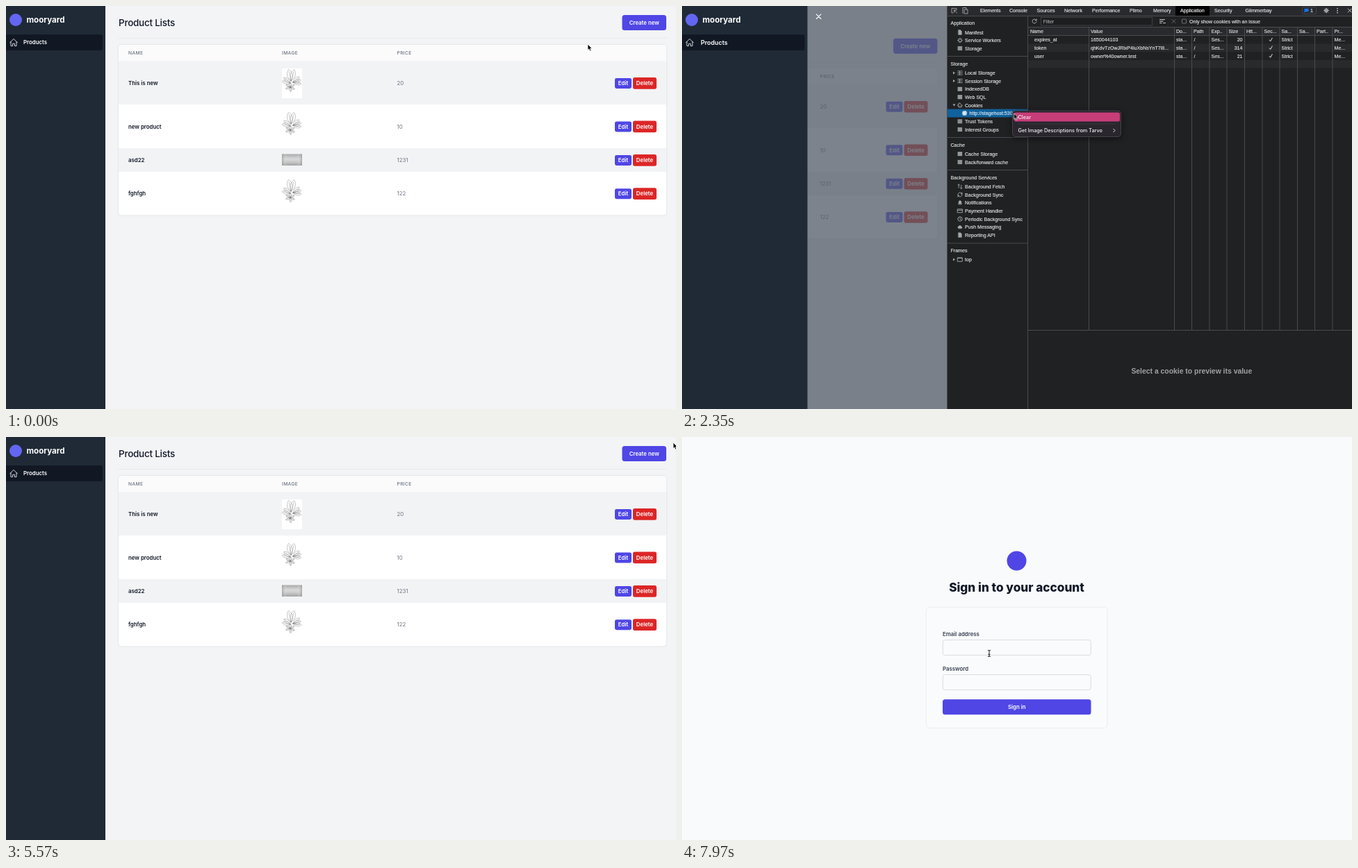
These frames come from a looping animation (964x581 px, 8000 ms). An HTML page:

```html
<!DOCTYPE html>
<html lang="en">
<head>
<meta charset="utf-8">
<title>Session expiry demo</title>
<style>
  html, body { margin: 0; width: 100%; height: 100%; overflow: hidden; background: #f3f4f6; }
  svg { display: block; width: 100%; height: 100%; }
  text { font-family: Inter, sans-serif; white-space: pre; }
  .dev text { font-family: "Liberation Sans", Arial, sans-serif; }
  .line { fill: none; stroke-linecap: round; stroke-linejoin: round; }
  .card { filter: drop-shadow(0 .6px .8px #0000001f); }

  #list, #tools, #login, #logo, #badge, #rows, #blur, #pick,
  #arrow, #cross, #hand, #beam { animation: 8s step-end infinite; }
  #list { animation-name: list; }
  #tools { animation-name: tools; }
  #login { animation-name: login; }
  #logo { animation-name: logo; }
  #badge { animation-name: badge; }
  #rows { animation-name: rows; }
  #blur { animation-name: blur; }
  #pick { animation-name: pick; }
  #arrow { animation-name: arrow; }
  #cross { animation-name: cross; }
  #hand { animation-name: hand; }
  #beam { animation-name: beam; }
  #menu { animation: menu 8s linear infinite; }
  #status { animation: status 8s linear infinite; }
  #cursor { animation: move 8s linear infinite; }

  /* 1% = 80 ms */
  @keyframes list { 0% { opacity: 1 } 2.125% { opacity: 0 } 69.625% { opacity: 1 } 87.125%, to { opacity: 0 } }
  @keyframes tools { 0% { opacity: 0 } 2.125% { opacity: 1 } 69.625%, to { opacity: 0 } }
  @keyframes login { 0% { opacity: 0 } 87.125%, to { opacity: 1 } }
  @keyframes logo { 0% { opacity: 0 } 89.25%, to { opacity: 1 } }
  @keyframes badge { 0% { opacity: 0 } 7.75%, to { opacity: 1 } }
  @keyframes rows { 0% { opacity: 1 } 39.4%, to { opacity: 0 } }
  @keyframes blur { 0% { opacity: 0 } 67.75%, to { opacity: 1 } }
  @keyframes pick { 0% { opacity: 0 } 28.625% { opacity: 1 } 36% { opacity: 0 } 36.75%, to { opacity: 1 } }
  @keyframes arrow { 0% { opacity: 1 } 6.2% { opacity: 0 } 7.75% { opacity: 1 } 81.6% { opacity: 0 } 87.125% { opacity: 1 } 95%, to { opacity: 0 } }
  @keyframes cross { 0% { opacity: 0 } 6.2% { opacity: 1 } 7.75%, to { opacity: 0 } }
  @keyframes hand { 0% { opacity: 0 } 81.6% { opacity: 1 } 87.125%, to { opacity: 0 } }
  @keyframes beam { 0% { opacity: 0 } 95%, to { opacity: 1 } }
  @keyframes menu { 0%, 25.62% { opacity: 0 } 25.625%, 38.6% { opacity: 1 } 40.6%, to { opacity: 0 } }
  @keyframes status { 0%, 84% { opacity: 0 } 85.25%, 88.6% { opacity: 1 } 90.5%, to { opacity: 0 } }
  @keyframes move {
    0%, 2.125% { transform: translate(837px, 55px) }
    5% { transform: translate(830px, 66px) }
    7%, 7.75% { transform: translate(820.5px, 72px) }
    8.375%, 10.6% { transform: translate(645px, 102px) }
    12.875%, 15.5% { transform: translate(485px, 107px) }
    21.25%, 28% { transform: translate(474px, 152.5px) }
    29.375% { transform: translate(477.5px, 154.5px) }
    32.25%, 38.6% { transform: translate(479px, 155px) }
    44.375%, 47.4% { transform: translate(890px, 181px) }
    49.125%, 52.125% { transform: translate(564px, 97px) }
    55%, 57.6% { transform: translate(419px, 43px) }
    59.5%, 61.75% { transform: translate(958px, 7px) }
    62.5%, 71.8% { transform: translate(960px, 8px) }
    74%, 75.8% { transform: translate(891px, 64px) }
    78.125% { transform: translate(816px, 54px) }
    80% { transform: translate(842px, 78px) }
    82.375%, 88.5% { transform: translate(881.5px, 111px) }
    92.5% { transform: translate(620px, 222px) }
    96.75% { transform: translate(442px, 310px) }
    97.5% { transform: translate(442px, 311px) }
    99.6%, to { transform: translate(442px, 312px) }
  }
</style>
</head>
<body>
<svg viewBox="0 0 964 581">
  <defs>
    <linearGradient id="grey" x2="0" y2="1">
      <stop stop-color="#a9aaa9"/><stop offset=".4" stop-color="#d6d7d6"/>
      <stop offset=".6" stop-color="#cfd0cf"/><stop offset="1" stop-color="#a4a5a4"/>
    </linearGradient>
    <linearGradient id="edge">
      <stop stop-color="#8b8c8b" stop-opacity=".6"/><stop offset=".25" stop-color="#fff" stop-opacity="0"/>
      <stop offset=".75" stop-color="#fff" stop-opacity="0"/><stop offset="1" stop-color="#8b8c8b" stop-opacity=".6"/>
    </linearGradient>
    <g id="flower"></g>
  </defs>
  <g id="list"></g>
  <g id="tools"></g>
  <g id="login"></g>
  <g id="status"></g>
  <g id="cursor">
    <path id="arrow" d="M0 0V8.6L1.9 6.9 3.2 9.9 4.8 9.2 3.5 6.3H6.1Z" fill="#000" stroke="#fff" stroke-width=".8"/>
    <g id="cross" class="line">
      <path d="M-3.2 3.8H3.2M0 .6V7" stroke="#fff" stroke-width="3.2"/>
      <path d="M-3.2 3.8H3.2M0 .6V7" stroke="#111" stroke-width="1.5"/>
    </g>
    <path id="hand" d="M-.6 .4Q.3-.5 1 .5V4L4.6 4.8Q6 5.3 5.6 7L4.8 10.3H.5L-2.4 6.6Q-2.6 5.2-.6 6.2Z" fill="#fff" stroke="#000" stroke-width=".7"/>
    <path id="beam" class="line" d="M-1.6-4.6Q0-4.8 0-3.6 0-4.8 1.6-4.6M0-3.6V3.6M-1.6 4.6Q0 4.8 0 3.6 0 4.8 1.6 4.6M-1 1.4H1" stroke="#111" stroke-width=".9"/>
  </g>
</svg>
<script>
const $ = id => document.getElementById(id);
const INDIGO = '#4f46e5', RED = '#dc2626', SMALL = 7.85;
const MID = 'text-anchor="middle"', SEMI = 'font-weight="600"';

// y is the optical middle of the capitals
const text = (x, y, s, size, fill, more = '') =>
  `<text x="${x}" y="${y + size * .36}" font-size="${size}" fill="${fill}" ${more}>${s}</text>`;
const rect = (x, y, w, h, fill, more = '') =>
  `<rect x="${x}" y="${y}" width="${w}" height="${h}" fill="${fill}" ${more}/>`;
const line = (d, stroke, width = 1, more = '') =>
  `<path class="line" d="${d}" stroke="${stroke}" stroke-width="${width}" ${more}/>`;
const button = (x, y, w, h, fill, label) =>
  rect(x, y, w, h, fill, `rx="${h * .16}"`) + text(x + w / 2, y + h / 2, label, SMALL, '#fff', MID + ' ' + SEMI);

function petals(cx, cy, len, angles) {
  const w = len * .27;
  const d = `M0 0C${-w} ${-len * .3} ${-w} ${-len * .75} 0 ${-len}C${w * 1.2} ${-len * .7} ${w} ${-len * .3} 0 0M0 0Q${w * .3} ${-len * .4} 0 ${-len * .8}`;
  return angles.map(a => line(d, '#777', .4, `transform="translate(${cx} ${cy}) rotate(${a})"`)).join('');
}
$('flower').innerHTML = petals(13, 18, 17, [-12, 16]) + petals(16, 20, 12, [48, 74, 100])
  + petals(12, 21, 12, [-78, -50]) + petals(12, 27, 7, [-110, -60, 0, 60, 115, 175]);

function nav(width, x, size) {
  return rect(0, 0, width, 581, '#1f2a36')
    + '<circle cx="14" cy="20" r="9" fill="#6366f1"/>'
    + text(29.5, 19.5, 'mooryard', 11.6, '#fff', 'font-weight="700"')
    + rect(-4, 41, width, 23, '#111824', 'rx="3"')
    + line('M5.6 52.8L11 47.4 16.4 52.8M7 51.6V57.6H9.6V54.3H12.4V57.6H15V51.6', '#e5e7eb', .9)
    + text(x, 52.3, 'Products', size, '#fff', SEMI);
}

function products(left, imageX, priceX, right, dy) {
  const wide = right - left, head = 'font-weight="550" letter-spacing=".34"';
  let s = text(left, 24, 'Product Lists', 13.5, '#111827', 'font-weight="550" letter-spacing="-.25"')
    + button(right - 63.5, 13, 63.5, 22, INDIGO, 'Create new')
    + line(`M${left} 46.5H${right}`, '#e5e7eb', .7)
    + rect(left, 56, wide, 245.5, '#fff', 'rx="4.5" class="card"')
    + rect(left, 56, wide, 24, '#fbfbfc', 'rx="4.5"')
    + line(`M${left} 80H${right}`, '#e5e7eb', .7)
    + text(left + 14, 68, 'NAME', 6.7, '#6b7280', head)
    + text(imageX, 68, 'IMAGE', 6.7, '#6b7280', head)
    + text(priceX, 68, 'PRICE', 6.7, '#6b7280', head);
  [['This is new', 20, 80, 62], ['new product', 10, 142, 63], ['asd22', 1231, 205, 34], ['fghfgh', 122, 239, 62.5]]
    .forEach(([name, price, y, h], i) => {
      const mid = y + h / 2 + .4;
      if (i % 2 == 0) s += rect(left, y, wide, h, '#f2f3f5');
      s += text(left + 14, mid, name, SMALL, '#111827', SEMI) + text(priceX, mid, price, SMALL, '#6b7280');
      s += i == 2
        ? rect(imageX, 213.5, 29, 16.5, 'url(#grey)') + rect(imageX, 213.5, 29, 16.5, 'url(#edge)')
        : rect(imageX, y + 10, 29, 43, '#fff') + `<use href="#flower" x="${imageX}" y="${y + 10}"/>`;
      s += button(right - 74, mid - 7.5, 24, 15, INDIGO, 'Edit')
        + button(right - 48, mid - 8.3, 34, 16.6, RED, 'Delete');
    });
  return `<g transform="translate(0 ${dy})">${s}</g>`;
}

$('list').innerHTML = rect(0, 0, 964, 581, '#f3f4f6') + products(162, 397, 562.5, 950, 0) + nav(143, 25, SMALL);

const INK = '#e3e4e6', DIM = '#a6a8ab', RULE = '#494b4f';
const icons = {
  file: 'M-2.4-3.4H.6L2.4-1.6V3.4H-2.4Z!',
  gear: 'M-2.2 0A2.2 2.2 0 1 0 2.2 0 2.2 2.2 0 1 0-2.2 0M0-3.5V-2.2M0 2.2V3.5M-3.5 0H-2.2M2.2 0H3.5M-2.4-2.4L-1.6-1.6M1.6 1.6L2.4 2.4M-2.4 2.4L-1.6 1.6M1.6-1.6L2.4-2.4',
  db: 'M-3-2.7H3V-1.3H-3ZM-3-.7H3V.7H-3ZM-3 1.3H3V2.7H-3Z!',
  grid: 'M-3.3-2.6H3.3M-3.3 0H3.3M-3.3 2.6H3.3M-.6-2.6V2.6',
  cookie: 'M-3.2 0A3.2 3.2 0 1 0 3.2 0Q1.8 0 1.4-1.3 0-1.5 0-3.2A3.2 3.2 0 0 0-3.2 0M-1.4-.8V-.7M.2 1.5V1.6M-1.3 1.4V1.5M1.6 1V1.1',
  fetch: 'M-1.8 2V-3.2M-3-2L-1.8-3.2-.6-2M1.8-2V3.2M.6 2L1.8 3.2 3 2',
  sync: 'M-2.9 1A3 3 0 0 1 2-2.2L3-1.4M3-3V-1.4H1.4M2.9-.6A3 3 0 0 1-2 2.2L-3 1.4M-3 3V1.4H-1.4',
  bell: 'M-2.8 2L-2 1V-1Q-1.8-2.8 0-3 1.8-2.8 2 -1V1L2.8 2ZM-.6 3H.6!',
  card: 'M-3.4-2.5H3.4V2.5H-3.4ZM-3.4-.8H3.4',
  clock: 'M-3.2 0A3.2 3.2 0 1 0 3.2 0 3.2 3.2 0 1 0-3.2 0M0-1.9V.2L1.4 1',
  cloud: 'M-2 2.2A1.7 1.7 0 0 1-2-1 2.3 2.3 0 0 1 2.1-.6 1.5 1.5 0 0 1 2.2 2.2Z!',
  frame: 'M-3.3-2.7H3.3V2.7H-3.3ZM-3.3-2.1H3.3'
};
// a trailing "!" marks a solid icon
function icon(name, x, y, color = DIM) {
  const [d, solid] = icons[name].split('!');
  return line(d, color, solid == null ? .9 : .4,
    `transform="translate(${x} ${y})"` + (solid == null ? '' : ` style="fill:${color}"`));
}
const label = (x, y, s, fill = INK, more = '') =>
  text(x, y, s, 7.08, fill, `stroke="${fill}" stroke-width=".15" ${more}`);
const folded = y => `<path d="M390 ${y - 2}L393 ${y} 390 ${y + 2}Z" fill="${DIM}"/>`;

function sidebar() {
  const items = [
    ['file', 'Manifest', 38], ['gear', 'Service Workers', 49.5], ['db', 'Storage', 61],
    ['grid', 'Local Storage', 96.5], ['grid', 'Session Storage', 108], ['db', 'IndexedDB', 119.7],
    ['db', 'Web SQL', 131.3], ['cookie', 'Cookies', 143], ['db', 'Trust Tokens', 166.4],
    ['db', 'Interest Groups', 178], ['db', 'Cache Storage', 213.2], ['db', 'Back/forward cache', 225],
    ['fetch', 'Background Fetch', 260.2], ['sync', 'Background Sync', 272], ['bell', 'Notifications', 283.6],
    ['card', 'Payment Handler', 295.3], ['clock', 'Periodic Background Sync', 307],
    ['cloud', 'Push Messaging', 318.6], ['file', 'Reporting API', 330.2], ['frame', 'top', 365.6]
  ];
  const heads = { Application: 24.5, Storage: 83, Cache: 200, 'Background Services': 247, Frames: 352 };
  const chosen = fill => rect(382, 148.6, 115.5, 11.8, fill);
  return chosen('#10629d') + `<g id="blur">${chosen('#454749')}</g>`
    + '<circle cx="406.5" cy="154.6" r="3.5" fill="#f1f6fa"/>' + icon('cookie', 406.5, 154.6, '#7fa9c8')
    + label(413.5, 154.6, 'http://stagehost:5300', '#e4eef6')
    + items.map(([i, s, y]) => icon(i, 400, y) + label(407, y, s)).join('')
    + Object.entries(heads).map(([s, y]) => label(386.5, y, s)).join('')
    + [96.5, 108, 365.6].map(folded).join('')
    + `<path d="M389.5 141.6H393.5L391.5 144.6Z" fill="${DIM}"/>`
    + line('M382 72.5H497M382 189.5H497M382 236.5H497M382 342H497', RULE);
}

function toolbar() {
  const tabs = { Elements: 429, Console: 471, Sources: 510.5, Network: 550, Performance: 590, Plimo: 644,
    Memory: 678, Application: 717, Security: 766, Glimmerbay: 810.5 };
  return rect(382, 0, 582, 14, '#292a2d') + rect(710, 0, 49, 14, '#000')
    + line('M382 14.5H964', RULE)
    + line('M390 9.8H388V3.4H395V5.5M391.5 6L395.5 10M391.5 6V9M391.5 6H394.5', DIM, .9)
    + line('M404 10.5V2.5H409V4.5M406.5 5H411V11H406.5Z', DIM, .9)
    + Object.entries(tabs).map(([s, x]) => label(x, 6.6, s, s == 'Application' ? '#fff' : INK)).join('')
    + `<g id="badge">${rect(892.5, 1.5, 20, 10, 'none', `rx="1" stroke="${RULE}" stroke-width=".8"`)}
       <path d="M895.5 3.8H901.5V8.2H897.5L895.5 9.8Z" fill="#1a73e8"/>${label(904, 6.6, '1')}</g>`
    + icon('gear', 927, 6.5, '#c4c6c9') + line('M927 4V9M924.5 6.5H929.5', '#c4c6c9', .9)
    + [3.6, 6.6, 9.6].map(y => `<circle cx="943" cy="${y}" r=".9" fill="#c4c6c9"/>`).join('')
    + line('M958.3 4L963.3 9M963.3 4L958.3 9', '#c4c6c9');
}

function cookies() {
  const columns = [['Name', 501], ['Value', 588], ['Do...', 711], ['Path', 736], ['Exp..', 761.5], ['Size', 786.5],
    ['Htt...', 812], ['Sec...', 837.5], ['Sa...', 862.5], ['Sa...', 888], ['Part..', 913], ['Pr...', 938.5]];
  const data = [['expires_at', '1650044103', 20], ['token', 'qhKdvTzOwJRlxP4iuXbNsYnT7l8...', 314],
    ['user', 'owner%40owner.test', 21]];
  const body = data.map(([name, value, size], i) => {
    const y = 48.6 + i * 11.7;
    return label(507, y, name) + label(588, y, value) + label(711, y, 'sta...') + label(736.5, y, '/')
      + label(761.5, y, 'Ses...') + label(806.5, y, size, INK, 'text-anchor="end"')
      + line(`M845.2 ${y + .4}L846.6 ${y + 2.3} 849.2 ${y - 2.4}`, INK, 1)
      + label(862.5, y, 'Strict') + label(938.5, y, 'Me...');
  }).join('');
  const funnel = color => line('M687.5 19.5H694.5M687.5 22H692M687.5 24.5H690M692.5 24.5H695.5', color, 1);
  return rect(498, 31, 466, 11.5, '#292a2d')
    + `<g id="rows">${rect(498, 54.5, 466, 11.7, '#292a2c')}${rect(498, 78, 466, 11.7, '#292a2c')}${body}</g>`
    + columns.map(([s, x]) => label(x, 36.8, s)).join('')
    + line('M498 30.5H964M498 42.5H964M498 467.5H964' + columns.slice(1).map(c => `M${c[1] - 2.5} 31V467`).join(''), RULE)
    + line('M509.6 20.4A3 3 0 1 0 510 22.6M510.2 18.8V20.8H508.2', '#b5b7ba', .9)
    + rect(516.5, 16.5, 160, 11.5, '#1d1e20', `stroke="${RULE}" stroke-width=".8"`)
    + label(519.5, 22.3, 'Filter', '#a2a4a8')
    + funnel('#6a6c70') + `<g style="animation:rows 8s step-end infinite">${funnel('#c0c2c5')}</g>`
    + line('M705 19.5L710 24.5M710 19.5L705 24.5', '#6a6c70', .9)
    + rect(719.5, 19, 6, 6, 'none', 'rx=".8" stroke="#85878b" stroke-width=".8"')
    + label(730, 22.3, 'Only show cookies with an issue')
    + text(733.3, 526, 'Select a cookie to preview its value', 10.4, '#a0a2a6', MID + ' font-weight="700"');
}

const menu = rect(475.5, 151, 156, 37.5, '#29262d', 'rx="4.5" stroke="#504d55" stroke-width=".8" style="filter:drop-shadow(0 2px 4px #0008)"')
  + `<g id="pick">${rect(478, 153.5, 152, 13, '#c73d79', 'rx="2.6"')}</g>`
  + text(483.5, 160, 'Clear', 7.3, '#f4f2f5', 'font-weight="500"')
  + line('M484 170H624', '#45424a', .7)
  + text(483.5, 179.5, 'Get Image Descriptions from Tarvo', 7.3, '#f4f2f5', 'font-weight="500"')
  + line('M620.8 177.2L623 179.5 620.8 181.8', '#f4f2f5', .9);

$('tools').innerHTML = rect(0, 0, 382, 581, '#f3f4f6') + products(18, 110, 198.5, 367.5, 33.8)
  + rect(0, 0, 382, 581, 'rgba(84,92,104,.76)') + nav(180.5, 27, 8.94)
  + line('M193.3 11.8L200 18.5M200 11.8L193.3 18.5', '#fff', 1.1)
  + `<g class="dev">${rect(381.5, 0, 583, 581, '#202123') + sidebar() + toolbar() + cookies()
    + line('M381.5 0V581M497.5 14V581', RULE)}</g>`
  + `<g id="menu">${menu}</g>`;

const field = (y, name) => text(375, y, name, SMALL, '#374151', SEMI)
  + rect(375.3, y + 8.3, 213, 22, '#fafbfc', 'rx="3.4" stroke="#d1d5db" stroke-width=".8"');

$('login').innerHTML = rect(0, 0, 964, 581, '#f9fafb')
  + '<circle id="logo" cx="481.5" cy="178.5" r="14" fill="#4f46e5"/>'
  + text(481.5, 217, 'Sign in to your account', 17.2, '#111827', MID + ' font-weight="800"')
  + rect(352, 246, 259.5, 173, '#fafbfc', 'rx="4.5" class="card"')
  + field(284.3, 'Email address') + field(334.3, 'Password')
  + button(375, 378.2, 213.5, 22, INDIGO, 'Sign in');

$('status').innerHTML = rect(-4, 572, 206.5, 14, '#26292e', 'rx="2" stroke="#4b4e54" stroke-width=".6"')
  + text(199, 578, 'stagehost:5300/admin/product/51388bc2fe7a904d26815ae7', 6.9, '#f0f1f2', 'text-anchor="end" font-weight="500"');
</script>
</body>
</html>
```
